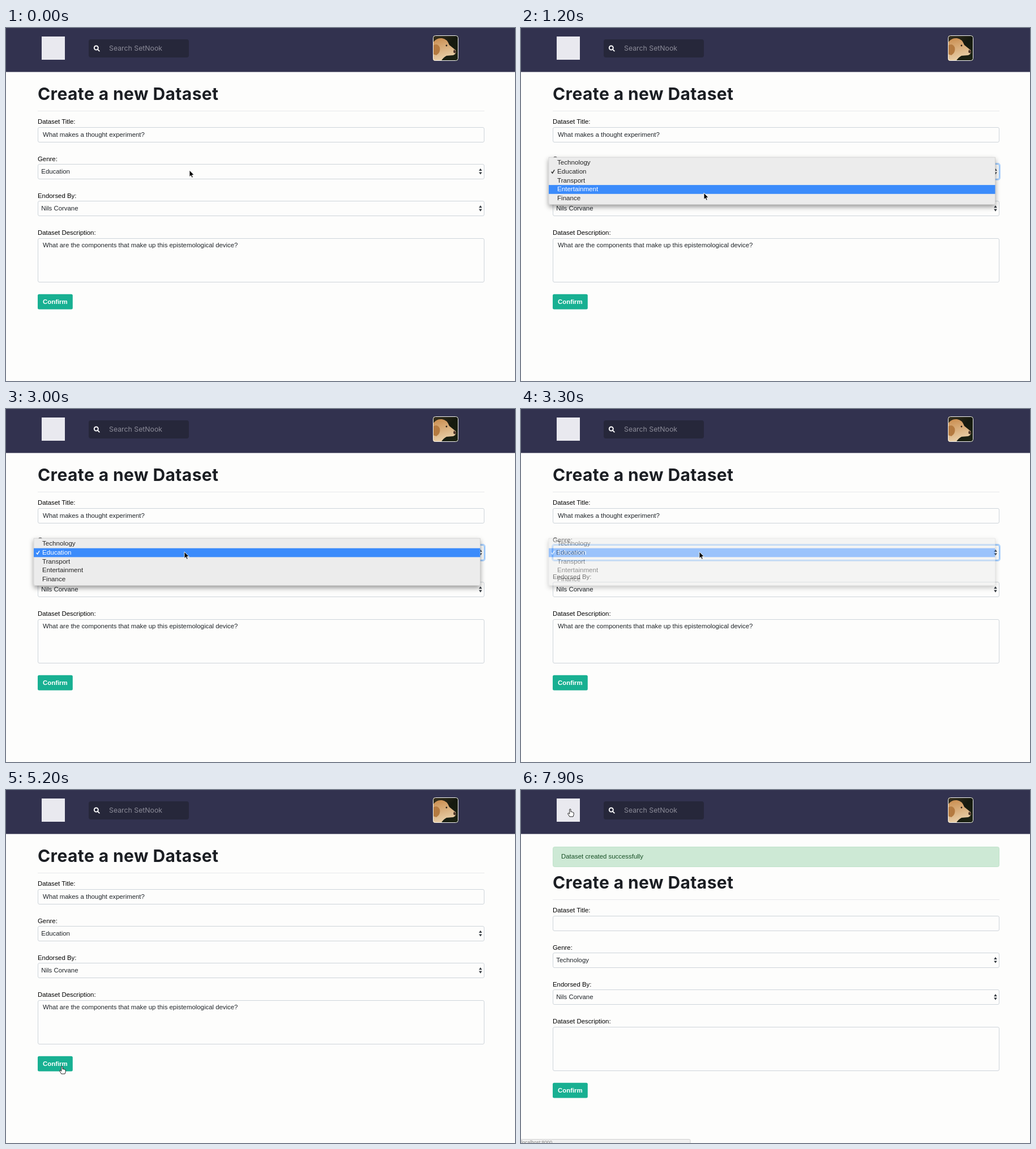
Write an HTML page that moves like this. It is 899 px wide and 623 px high and loops after 8 s.

```html
<!DOCTYPE html>
<html lang="en">
<head>
<meta charset="utf-8">
<title>Create a new Dataset</title>
<style>
html, body { margin: 0; width: 100%; height: 100%; overflow: hidden; background: #fdfdfc; }
svg { display: block; font: 11.4px "Liberation Sans", Arial, sans-serif; }
.display { font-family: Inter, sans-serif; }
.field { fill: #fdfdfc; stroke: #ced4da; }
.value { fill: #1f2429; }
#menu text { font-size: 11.6px; }
</style>
</head>
<body>
<svg width="899" height="623" viewBox="0 0 899 623">
  <defs>
    <linearGradient id="dusk" x2="1" y2="1">
      <stop stop-color="#3b3320"/><stop offset=".5" stop-color="#15190f"/><stop offset="1" stop-color="#1d2413"/>
    </linearGradient>
    <linearGradient id="fur" x2=".3" y2="1">
      <stop stop-color="#c98b4c"/><stop offset="1" stop-color="#e8cfa9"/>
    </linearGradient>
    <clipPath id="frame"><rect x="754" y="13" width="45" height="45" rx="4"/></clipPath>
    <filter id="shade" x="-5%" y="-20%" width="110%" height="150%">
      <feDropShadow dx="0" dy="4" stdDeviation="4.5" flood-color="#000" flood-opacity=".4"/>
    </filter>
    <path id="arrows" d="M835.2 252l2.8-4.2 2.8 4.2zM835.2 254.4l2.8 4.2 2.8-4.2z" fill="#343a40"/>
  </defs>

  <rect width="899" height="77.6" fill="#32324f"/>
  <rect x="63" y="15" width="41" height="41" fill="#e9e9ef"/>
  <rect x="146" y="20" width="177" height="32" rx="4" fill="#26273a"/>
  <g fill="none" stroke="#fff" stroke-width="1.9">
    <circle cx="159.3" cy="35" r="3.5"/><path d="M161.8 37.6l3 3" stroke-linecap="round"/>
  </g>
  <text class="display" x="182" y="40" font-size="12.3" fill="#8b8b98">Search SetNook</text>

  <g clip-path="url(#frame)">
    <rect x="754" y="13" width="45" height="45" fill="url(#dusk)"/>
    <path d="M754 26Q760 17 770 18Q779 19 783 30L794 39Q797 45 790 48L778 49Q771 53 769 58H754Z" fill="url(#fur)"/>
    <path d="M754 31Q762 26 766 34Q768 43 760 48L754 46Z" fill="#b47a40"/>
    <path d="M791 38l4 3-1 4-4-2z" fill="#4a3428"/>
    <circle cx="778" cy="31" r="1.4" fill="#2c2018"/>
  </g>
  <rect x="754.5" y="13.5" width="44" height="44" rx="4" fill="none" stroke="#f4f4f2"/>

  <g id="alert">
    <rect x="56.5" y="100.5" width="788" height="35" rx="3" fill="#cde9d5" stroke="#c0e2ca"/>
    <text x="71" y="121.4" fill="#174f25">Dataset created successfully</text>
  </g>

  <g id="form">
    <text class="display" x="56" y="127" font-size="30" font-weight="700" letter-spacing=".4" fill="#1b1e23">Create a new Dataset</text>
    <path d="M56 146.5H845" stroke="#e7e8ea"/>
    <g>
      <text x="56" y="169.4">Dataset Title:</text>
      <text x="56" y="234.6">Genre:</text>
      <text x="56" y="300">Endorsed By:</text>
      <text x="56" y="365.3">Dataset Description:</text>
    </g>
    <rect class="field" x="56.5" y="175.5" width="788" height="26" rx="2.5"/>
    <rect id="ring" x="55" y="239" width="791" height="29" rx="4" fill="none" stroke="#b3d5fd" stroke-width="2"/>
    <rect id="genreBox" class="field" x="56.5" y="240.5" width="788" height="26" rx="2.5"/>
    <rect class="field" x="56.5" y="305.5" width="788" height="26" rx="2.5"/>
    <rect class="field" x="56.5" y="371.5" width="788" height="77" rx="2.5"/>
    <use href="#arrows"/><use href="#arrows" y="65.2"/>
    <g class="value">
      <text id="genre" x="62.3" y="256.8"></text>
      <text x="62.3" y="322.2">Nils Corvane</text>
      <g id="entries">
        <text x="65" y="191.6">What makes a thought experiment?</text>
        <text x="65" y="387.4">What are the components that make up this epistemological device?</text>
      </g>
    </g>
    <rect x="56" y="469.8" width="61.8" height="26.8" rx="2.5" fill="#18b092"/>
    <text x="65" y="486.8" font-weight="700" fill="#fff">Confirm</text>
  </g>

  <g id="menu">
    <path d="M49 228.2H837.5V308.5q0 3-3 3H52q-3 0-3-3Z" fill="#ececec" stroke="#c6c6c6" stroke-width=".6" filter="url(#shade)"/>
    <rect id="bar" x="49" width="788.5" height="15.7" fill="#3b8bfb"/>
    <path id="tick" d="M53.6 253.6l1.9 2.6 3.6-5.8" fill="none" stroke-width="1.4"/>
  </g>

  <g id="status">
    <path d="M-1 616.5H297q2 0 2 2V624H-1Z" fill="#e9e9e9" stroke="#b5b5b5"/>
    <text id="note" x="0.5" y="625.2" font-size="8.5" fill="#333"></text>
  </g>

  <g id="pointer">
    <path id="arrow" d="M0 0V11.6L2.6 9.3 4.3 13.2 6.3 12.4 4.6 8.5H8.2Z" fill="#000" stroke="#fff" stroke-width=".9"/>
    <path id="beam" d="M-2.5-5.5Q0-5.5 0-4Q0-5.5 2.5-5.5M0-4.5V4.5M-2.5 5.5Q0 5.5 0 4Q0 5.5 2.5 5.5M-1.5 1.5H1.5" fill="none" stroke="#222"/>
    <path id="hand" d="M-1.2 0Q0-1 1 .2V4.6Q2.3 3.8 3 5Q4.3 4.4 4.8 5.6Q6.3 5.2 6.2 7V9.5L5 13H-1.2L-4.2 8.2Q-4.4 6.4-2.8 6.8L-1.2 8.3Z" fill="#fff" stroke="#111" stroke-width=".9"/>
  </g>
</svg>
<script>
const LOOP = 8000, STEP = 100, SHIFT = 47;
const OPEN = 600, CLOSE = 3200, CLICK = 5200, WAIT = 5500, DONE = 5700, LEAVE = 6800;
const ROW_TOP = 229.7, ROW = 15.7;
const $ = id => document.getElementById(id);
const clamp = v => Math.max(0, Math.min(1, v));

// time, x, y
const path = [
  [0, 324, 251], [700, 324, 251], [1200, 323, 291], [1500, 323, 291], [2200, 320, 270],
  [3000, 315, 252], [3400, 315, 252], [4400, 157, 448], [4900, 99, 488],
  [LEAVE, 99, 488], [7600, 87, 34], [LOOP, 87, 34]
];

const items = ['Technology', 'Education', 'Transport', 'Entertainment', 'Finance'].map((name, i) => {
  const text = document.createElementNS('http://www.w3.org/2000/svg', 'text');
  text.textContent = name;
  text.setAttribute('x', 64);
  text.setAttribute('y', ROW_TOP + ROW * i + 11.6);
  $('menu').append(text);
  return text;
});

function pointerAt(t) {
  const i = path.findIndex(p => p[0] > t);
  const [t0, x0, y0] = path[i - 1], [t1, x1, y1] = path[i];
  const u = (t - t0) / (t1 - t0), k = u * u * (3 - 2 * u);
  return [x0 + (x1 - x0) * k, y0 + (y1 - y0) * k];
}

function pointerKind(t, x, y) {
  if (t >= DONE && t <= LEAVE) return 'arrow';
  if (y < 57 && x < 112) return 'hand';
  const fy = t >= DONE ? y - SHIFT : y;
  if (fy > 469 && fy < 498 && x < 118) return 'hand';
  const inText = (fy > 370 && fy < 450) || (fy > 174 && fy < 203);
  return inText ? 'beam' : 'arrow';
}

const show = (id, on) => $(id).style.display = on ? '' : 'none';

function draw(now) {
  const t = Math.floor(now % LOOP / STEP) * STEP;
  const done = t >= DONE, focused = t >= OPEN && t < CLICK;
  const [x, y] = pointerAt(t);

  show('alert', done);
  show('entries', !done);
  $('form').setAttribute('transform', `translate(0 ${done ? SHIFT : 0})`);
  $('genre').textContent = done ? 'Technology' : 'Education';
  show('ring', focused);
  $('genreBox').style.stroke = focused ? '#80bdff' : '';

  show('menu', t >= OPEN && t < CLOSE + 200);
  $('menu').style.opacity = 1 - clamp((t - CLOSE) / 200);
  const row = Math.floor((y - ROW_TOP) / ROW);
  $('bar').setAttribute('y', ROW_TOP + ROW * row + .3);
  items.forEach((item, i) => item.setAttribute('fill', i === row ? '#fff' : '#262626'));
  $('tick').setAttribute('stroke', row === 1 ? '#fff' : '#262626');

  const hover = t >= 7300;
  $('note').textContent = hover ? 'localhost:8000' : 'Waiting for localhost...';
  $('status').style.opacity = hover ? clamp((t - 7600) / 500)
    : t < WAIT ? 0 : 1 - clamp((t - 6400) / 300);

  const kind = pointerKind(t, x, y);
  ['arrow', 'beam', 'hand'].forEach(id => show(id, id === kind));
  $('pointer').setAttribute('transform', `translate(${x} ${y})`);
}

const start = performance.now();
function tick() {
  draw(performance.now() - start);
  requestAnimationFrame(tick);
}
tick();
</script>
</body>
</html>
```
